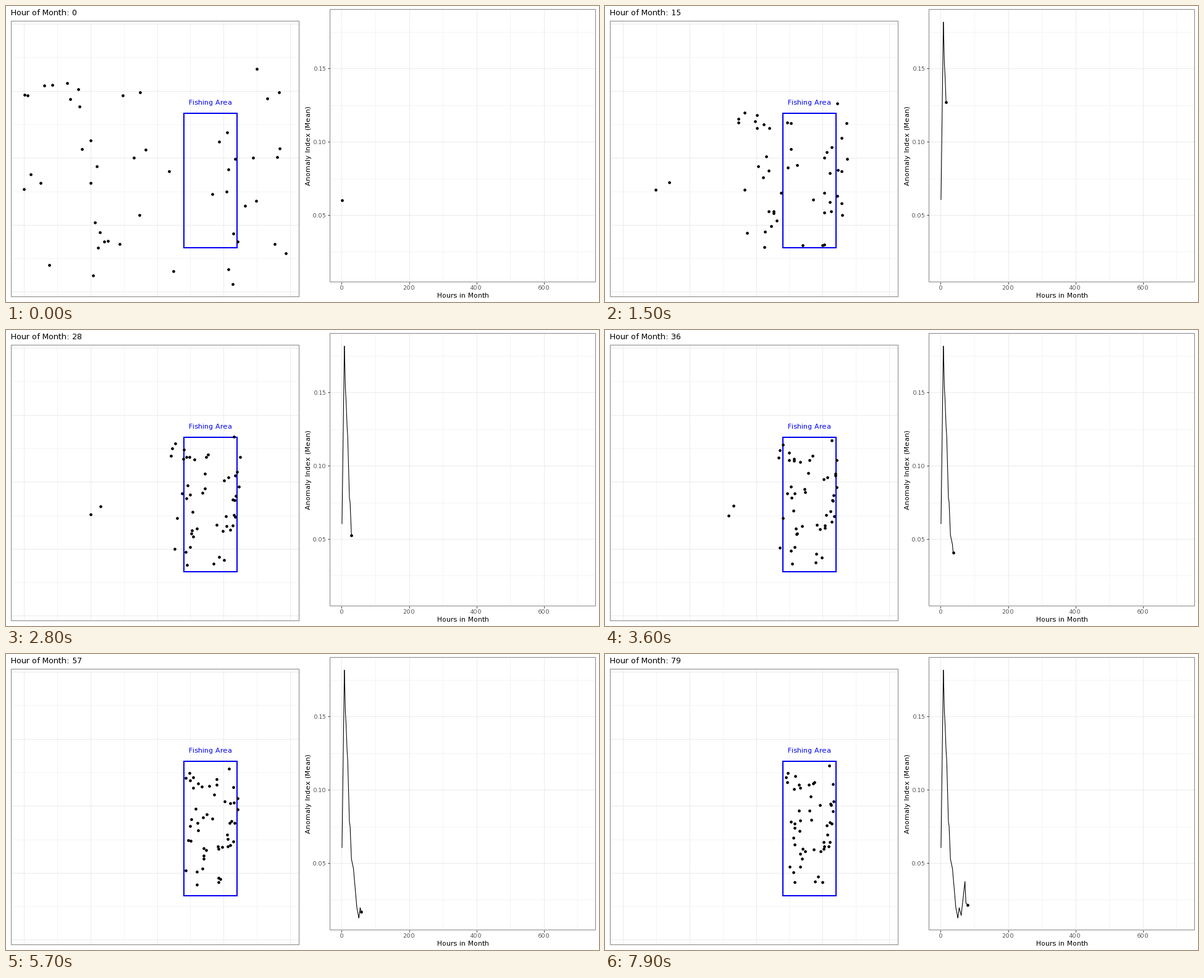
Recreate the animation shown at these times as a matplotlib script. Size 960 px wide and 480 px high, loop 8000 ms.

```python
import numpy as np
import matplotlib.pyplot as plt
from matplotlib.animation import FuncAnimation
from matplotlib.patches import Rectangle

W, H, DPI = 960, 480, 100
PX = 72 / DPI
HOURS = 80
BLUE, MAJOR, MINOR = "#0000ee", "#ebebeb", "#f4f4f4"

# Whole-pixel glyph advances
plt.rcParams.update({"font.family": "DejaVu Sans", "text.hinting_factor": 1})

rng = np.random.default_rng(4)

# Boats start at these spots; all but the last eight have a companion nearby
spots = np.array([
    (29, 297), (35, 145), (62, 129), (99, 125), (119, 163), (137, 218),
    (137, 287), (144, 351), (149, 392), (184, 386), (207, 246), (217, 140),
    (442, 140), (439, 245), (371, 248), (358, 205), (334, 305), (387, 324),
    (368, 369), (453, 401), (367, 451),
    (40, 273), (141, 437), (70, 420), (216, 339), (264, 268), (406, 102),
    (360, 265), (271, 430)])
pairs = len(spots) - 8
angle = rng.uniform(0, 2 * np.pi, pairs)
reach = rng.uniform(10, 30, pairs)
step = np.c_[np.cos(angle), np.sin(angle)] * reach[:, None]
start = np.vstack([spots, np.clip(spots[:pairs] + step, (30, 100), (455, 450))])
count = len(start)

# Each boat fishes where its start lands when the map is squeezed into the area
home = start * (0.17, 0.5) + (292, 137) + rng.normal(0, (9, 14), (count, 2))
home = np.clip(home, (292, 182), (370, 388))
phase = rng.uniform(0, 2 * np.pi, (count, 2))

# The first pair waits on its way
late = [0, len(spots)]
late_hours = [0, 9, 18, 28, 44, 57, 79]
late_share = [0, 0.19, 0.19, 0.39, 0.85, 0.98, 1]

# Key points of the anomaly curve: hour and stage height
curve_h, curve_y = np.transpose([
    (0, 314.5), (7, 26), (10, 93), (12, 113), (15, 155.5), (17, 173),
    (22, 272), (24, 279), (28, 332.5), (34, 348), (44, 411), (50, 428),
    (54, 411.5), (60, 424), (71, 369), (74, 404), (79, 406.5)])


def fleet(hour):
    share = np.full((count, 1), 1 - np.exp(-hour / 12.5))
    share[late] = np.interp(hour, late_hours, late_share)
    wander = 6 * (np.sin(phase + hour / 12) - np.sin(phase))
    calm = 1 - np.exp(-hour / 60)
    return start + (home - start) * share + wander * share * calm


def hour_x(hour):
    return 543.4 + 0.5455 * hour


fig = plt.figure(figsize=(W / DPI, H / DPI), dpi=DPI, facecolor="white")
ax = fig.add_axes([0, 0, 1, 1])
ax.set_xlim(0, W)
ax.set_ylim(H, 0)
ax.axis("off")


def line(xs, ys, color, width=1, z=1):
    return ax.plot(xs, ys, color=color, lw=width * PX, zorder=z,
                   solid_capstyle="butt")[0]


def label(x, y, text, size=11, color="black", **kw):
    return ax.text(x, y, text, fontsize=size * PX, color=color, zorder=6, **kw)


def box(x0, y0, x1, y1, color, width, z):
    ax.add_patch(Rectangle((x0, y0), x1 - x0, y1 - y0, fill=False,
                           ec=color, lw=width * PX, zorder=z))


def panel(x0, y0, x1, y1, xs, ys):
    """Frame with a grid; xs and ys alternate major and minor lines."""
    for i, x in enumerate(xs):
        line([x, x], [y0, y1], MINOR if i % 2 else MAJOR, z=1.5 - i % 2)
    for i, y in enumerate(ys):
        line([x0, x1], [y, y], MINOR if i % 2 else MAJOR, z=1.5 - i % 2)
    box(x0, y0, x1, y1, "#858585", 1, 3)


panel(8, 24, 474, 471, 28.8 + 53.93 * np.arange(9), 29 + 54.3 * np.arange(9))
# The height grid starts on a major line that lies below the panel's foot
ys = 339 - 59.45 * np.arange(6)
panel(524, 5, 954, 447, hour_x(100 * np.arange(8)), ys)
line([524, 954], [398, 398], MINOR)

for i in range(4):
    x = hour_x(200 * i)
    line([x, x], [448, 451], "#333333", z=3)
    label(x, 460, str(200 * i), 8.8, "#4d4d4d", ha="center")
for i in range(3):
    y = ys[2 * i]
    line([521, 524], [y, y], "#333333", z=3)
    label(519, y + 4, f"{0.05 * (i + 1):.2f}", 8.8, "#4d4d4d", ha="right")

label(739.5, 473, "Hours in Month", ha="center")
label(490, 226.5, "Anomaly Index (Mean)", rotation=90, ha="center", va="center")
label(331.5, 160, "Fishing Area", color=BLUE, ha="center")
title = label(8, 15, "", 13.2)

box(288, 174, 374, 392, BLUE, 2, 4)
dot = dict(marker="o", ls="", color="black", ms=4.7 * PX, mew=0, zorder=5)
boats, = ax.plot([], [], **dot)
head, = ax.plot([], [], **dot)
trace = line([], [], "black", 1.07, 4)


def draw(hour):
    boats.set_data(*(fleet(hour) + 0.4).T)
    hours = np.arange(hour + 1)
    x, y = hour_x(hours + 1), np.interp(hours, curve_h, curve_y)
    trace.set_data(x, y)
    head.set_data(x[-1:], y[-1:])
    title.set_text(f"Hour of Month: {hour}")
    return boats, trace, head, title


anim = FuncAnimation(fig, draw, frames=HOURS, interval=100,
                     repeat=True, repeat_delay=0, blit=False)
plt.show()
```
